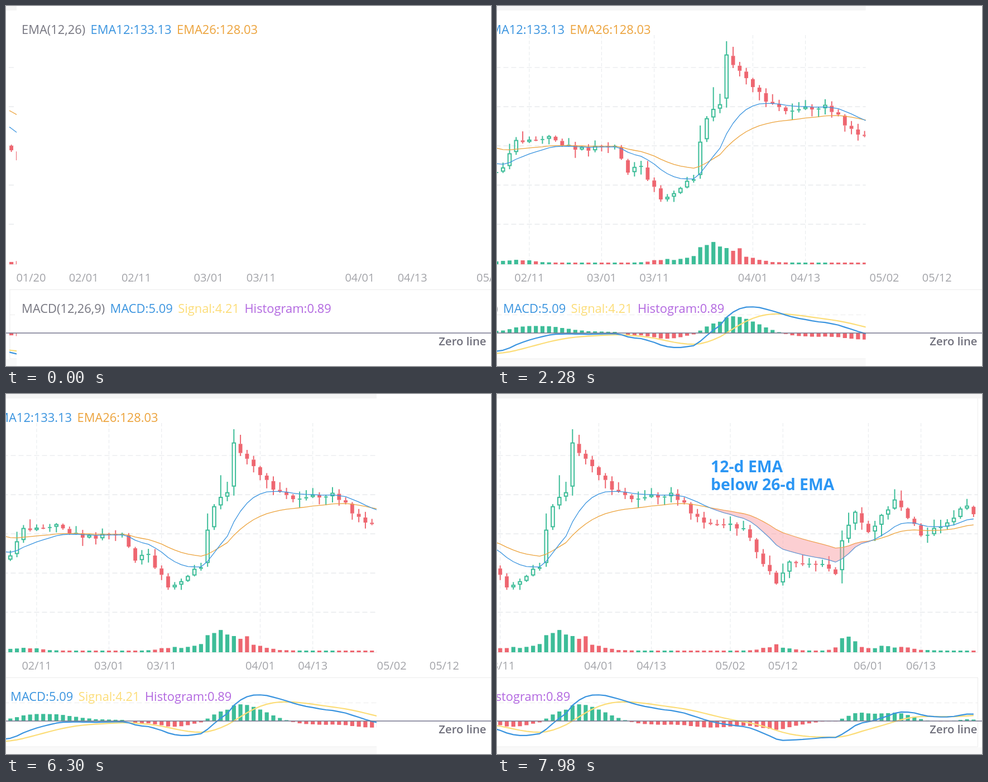
These frames come from a looping animation (869 px wide and 644 px high, 8000 ms). An HTML page with a canvas:

```html
<!DOCTYPE html>
<html lang="en">
<head>
<meta charset="utf-8">
<title>EMA and MACD</title>
<style>
html, body { margin: 0; width: 100%; height: 100%; overflow: hidden; background: #fff; }
canvas { display: block; }
</style>
</head>
<body>
<canvas id="stage" width="869" height="644"></canvas>
<script>
const ctx = document.getElementById('stage').getContext('2d');
const W = 869, H = 644, LOOP = 8000, ZERO = 585, STEP = 11.78, DAYS = 111, END = 1313;
const GREEN = '#3dbd98', RED = '#ee6670', BLUE = '#3a94df', ORANGE = '#eca33c',
  YELLOW = '#fcdd78', PURPLE = '#b267e0', GREY = '#777781', ACCENT = '#2b96f4';
const FAMILY = '"Open Sans", "Noto Sans", sans-serif';

// Turning points of the price: day, height on the stage
const turns = [
  [0, 258], [1, 276], [7, 291], [8, 311], [11, 267], [13, 298], [15, 289], [17, 240], [22, 233],
  [26, 257], [32, 250], [34, 298], [36, 286], [39, 346], [44, 310], [45, 243], [46, 201], [48, 176],
  [49, 87], [53, 145], [55, 171], [58, 188], [64, 177], [69, 230], [75, 240], [80, 339], [82, 300],
  [87, 304], [89, 322], [90, 262], [92, 211], [94, 247], [98, 189], [102, 253], [105, 238], [109, 200],
  [110, 215]];
// Busy spells: middle day, extra volume, spread in days
const spells = [[6, 6, 5], [17, 5, 3], [39, 5, 2], [48, 34, 4.5], [80, 9, 2.5], [91, 24, 1.7], [97, 8, 4]];
const dates = { 3: '01/20', 11: '02/01', 19: '02/11', 30: '03/01', 38: '03/11', 53: '04/01',
  61: '04/13', 73: '05/02', 81: '05/12', 94: '06/01', 102: '06/13' };

function random(day, salt) {
  const v = Math.sin(day * 12.9898 + salt * 78.233) * 43758.5453;
  return v - Math.floor(v);
}
function priceAt(day) {
  const n = turns.findIndex(turn => turn[0] >= day);
  const [d1, p1] = turns[n];
  if (d1 === day) return p1;
  const [d0, p0] = turns[n - 1];
  return p0 + (p1 - p0) * (day - d0) / (d1 - d0) + (random(day, 1) - 0.5) * 10;
}
function ema(values, days, start) {
  let last = start;
  return values.map((v, i) => i ? last += (v - last) * 2 / (days + 1) : last);
}

const close = Array.from({ length: DAYS }, (_, i) => priceAt(i));
const candles = close.map((end, i) => {
  const before = i ? close[i - 1] : 249;
  const start = before + (end - before) * 0.12;
  const busy = spells.reduce((sum, [day, size, spread]) =>
    sum + size * Math.exp(-(((i - day) / spread) ** 2)), 0);
  const wick = salt => 2 + random(i, salt) ** 2 * (13 + busy * 0.8);
  const top = Math.min(start, end), bottom = Math.max(start, end);
  return { top, bottom, rising: end < start, high: top - wick(2), low: bottom + wick(3),
    volume: 3 + busy * (0.65 + 0.7 * random(i, 4)) };
});
const fast = ema(close, 12, 219), slow = ema(close, 26, 189);
const macd = fast.map((v, i) => (v - slow[i]) * 1.17);
const signal = ema(macd, 9, 31);
const dayX = i => 9.6 + STEP * i;

const clamp = v => Math.max(0, Math.min(1, v));
// Cubic timing curve with control points (a, 0) and (b, 1)
function ease(p, a, b) {
  p = clamp(p);
  if (p === 0 || p === 1) return p;
  let lo = 0, hi = 1, s;
  for (let n = 0; n < 24; n++) {
    s = (lo + hi) / 2;
    const r = 1 - s;
    if (3 * a * s * r * r + 3 * b * s * s * r + s * s * s < p) lo = s; else hi = s;
  }
  return s * s * (3 - 2 * s);
}

function line(x1, y1, x2, y2, color, width = 1, dash = []) {
  ctx.setLineDash(dash);
  ctx.strokeStyle = color;
  ctx.lineWidth = width;
  ctx.beginPath();
  ctx.moveTo(x1, y1);
  ctx.lineTo(x2, y2);
  ctx.stroke();
  ctx.setLineDash([]);
}
function rect(x, y, w, h, color) {
  ctx.fillStyle = color;
  ctx.fillRect(x, y, w, h);
}
function text(str, x, y, size, color, weight = 400, align = 'left') {
  ctx.font = `${weight} ${size}px ${FAMILY}`;
  ctx.textAlign = align;
  ctx.fillStyle = color;
  ctx.fillText(str, x, y);
}
function drawLegend(y, parts) {
  let x = 28;
  for (const [str, color] of parts) {
    text(str, x, y, 21.9, color);
    x += ctx.measureText(str).width + 9.4;
  }
}
function curve(values, color, width, base = 0) {
  ctx.strokeStyle = color;
  ctx.lineWidth = width;
  ctx.lineJoin = 'round';
  ctx.beginPath();
  // Continue a little to the left of the first value
  ctx.lineTo(dayX(-0.3), base + values[0] * 1.3 - values[1] * 0.3);
  values.forEach((v, i) => ctx.lineTo(dayX(i), base + v));
  ctx.stroke();
}

function drawGrid() {
  for (let n = 0; n < 5; n++) line(5, 110 + n * 70.1, END, 110 + n * 70.1, '#e3e6e9', 1.2, [9, 5]);
  for (const i in dates) line(dayX(i), 52, dayX(i), 462, '#e8ebee', 1.1, [6, 4]);
  line(5, 462.5, END, 462.5, '#eeeeee');
  line(END, 8, END, 462, '#eeeeee');
}
function drawCandle({ top, bottom, rising, high, low, volume }, i) {
  const x = dayX(i), color = rising ? GREEN : RED;
  line(x, high, x, top, color, 2);
  line(x, bottom, x, low, color, 2);
  if (rising && bottom - top > 3) {
    ctx.strokeStyle = color;
    ctx.lineWidth = 2;
    ctx.strokeRect(x - 2.8, top + 0.6, 5.6, bottom - top - 1.2);
  } else {
    rect(x - 3.4, top, 6.8, Math.max(1.8, bottom - top), color);
  }
  rect(x - 3.6, 462 - volume, 7.2, volume, color);
}
function drawMacd() {
  line(7, 552.5, END, 552.5, '#ececec', 1, [9, 5]);
  macd.forEach((m, i) => {
    const h = m - signal[i];
    rect(dayX(i) - 3.6, Math.min(ZERO, ZERO + h), 7.2, Math.abs(h), h < 0 ? GREEN : RED);
  });
  curve(signal, YELLOW, 2.2, ZERO);
  curve(macd, BLUE, 2.2, ZERO);
}
function fillBetween(first, last, outer, color, alpha) {
  ctx.globalAlpha = alpha;
  ctx.fillStyle = color;
  ctx.beginPath();
  for (let i = first; i <= last; i++) ctx.lineTo(dayX(i), fast[i]);
  for (let i = last; i >= first; i--) ctx.lineTo(dayX(i), outer(fast[i], slow[i]));
  ctx.fill();
  ctx.globalAlpha = 1;
}
function drawNote(word, x, y, alpha) {
  ctx.globalAlpha = alpha;
  text('12-d EMA', x, y, 28.4, ACCENT, 700);
  text(word + ' 26-d EMA', x, y + 32, 28.4, ACCENT, 700);
  ctx.globalAlpha = 1;
}
function drawLens(scroll, alpha) {
  if (!alpha) return;
  const cx = 375.3, cy = 584, radius = 42, zoom = 2.08, focusX = 390;
  const circle = () => {
    ctx.beginPath();
    ctx.arc(cx, cy, radius, 0, Math.PI * 2);
  };
  ctx.globalAlpha = alpha;
  ctx.save();
  circle();
  ctx.clip();
  rect(cx - radius, cy - radius, radius * 2, radius * 2, '#fff');
  ctx.translate(focusX, 584.5);
  ctx.scale(zoom, zoom);
  ctx.translate(-focusX - scroll, -ZERO);
  drawMacd();
  line(0, ZERO, END, ZERO, '#8d8da3', 2.3);
  ctx.restore();
  ctx.strokeStyle = ACCENT;
  ctx.lineWidth = 3.2;
  circle();
  ctx.stroke();
  line(286, 449, 351.5, 548, ACCENT, 4);
  ctx.globalAlpha = 1;
}

function draw(t) {
  const first = t / 1538, drift = clamp((t - 1538) / 4760), second = (t - 6300) / 900;
  const scroll = 175 * ease(first, 0.32, 0.55) + 3.5 * drift + 273 * ease(second, 0.3, 0.14);
  const edge = 19 + 641 * ease(first, 0.125, 0.55) + 4 * drift + 216 * ease(second, 0.3, 0.47);
  const leave = 1 - clamp((t - 5900) / 300);
  const above = clamp((t - 2600) / 400) * leave;
  const lens = clamp((t - 3380) / 180) * leave;
  const below = clamp((t - 7560) / 340);

  rect(0, 0, W, H, '#fff');
  ctx.save();
  ctx.beginPath();
  ctx.rect(0, 0, edge, H);
  ctx.clip();
  rect(0, 0, W, 8, '#f5f5f5');
  rect(0, 632, W, 12, '#f9f9f9');
  ctx.translate(-scroll, 0);
  drawGrid();
  candles.forEach(drawCandle);
  curve(slow, ORANGE, 1.3);
  curve(fast, BLUE, 1.3);
  fillBetween(46, 70, Math.max, 'rgba(112,255,255,.5)', above);
  fillBetween(70, 95, Math.min, 'rgba(248,150,155,.45)', below);
  line(7, 507, 7, 631, '#ececec');
  line(END, 507, END, 631, '#ececec');
  line(7, 631, END, 631, '#ececec');
  drawMacd();
  ctx.restore();

  ctx.save();
  ctx.translate(-scroll, 0);
  line(7, 507.5, END, 507.5, '#ececec');
  for (const i in dates) text(dates[i], dayX(i), 493, 20, '#a3a4a9', 400, 'center');
  drawLegend(50, [['EMA(12,26)', GREY], ['EMA12:133.13', BLUE], ['EMA26:128.03', ORANGE]]);
  drawLegend(548.5, [['MACD(12,26,9)', GREY], ['MACD:5.09', BLUE], ['Signal:4.21', YELLOW],
    ['Histogram:0.89', PURPLE]]);
  ctx.restore();

  line(0, ZERO, W, ZERO, '#74748c', 1.6);
  text('Zero line', 860.5, 606.5, 20.3, '#70707c', 600, 'right');
  drawNote('above', 508.5, 269.4, above);
  drawNote('below', 383, 140.4, below);
  drawLens(scroll, lens);
}

const begin = performance.now();
function tick() {
  draw((performance.now() - begin) % LOOP);
  requestAnimationFrame(tick);
}
tick();
</script>
</body>
</html>
```
